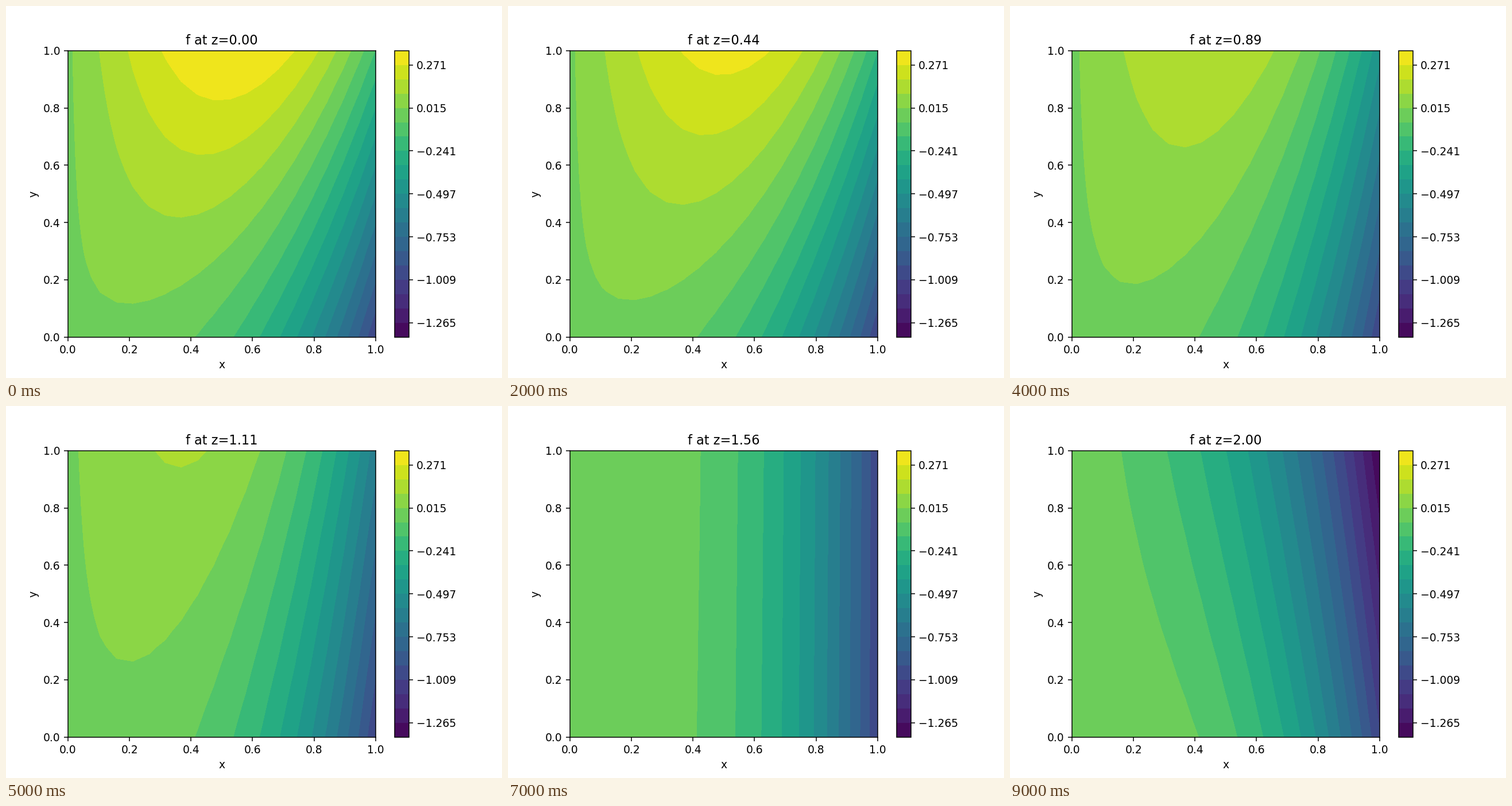
A matplotlib script for the animation above (10000 ms loop, 864 by 648 pixels).

```python
import numpy as np
import matplotlib.pyplot as plt
from matplotlib.animation import FuncAnimation

N_GRID = 20
N_BANDS = 20

x = np.linspace(0, 1, N_GRID)
y = np.linspace(0, 1, N_GRID)
z = np.linspace(0, 2, 10)
X, Y = np.meshgrid(x, y)


def field(height):
    return np.sin(X) * Y * np.cos(height) - X**3


slices = [field(h) for h in z]
levels = np.linspace(np.min(slices), np.max(slices), N_BANDS + 1)

fig, ax = plt.subplots(figsize=(6.4, 4.8), dpi=135)
contours = None


def draw(i):
    global contours
    if contours is not None:
        contours.remove()
    contours = ax.contourf(X, Y, slices[i], levels=levels, cmap="viridis")
    ax.set_title(f"f at z={z[i]:.2f}")
    return [contours]


draw(0)
fig.colorbar(contours, ax=ax)
ax.set_xlabel("x")
ax.set_ylabel("y")

anim = FuncAnimation(fig, draw, frames=len(z), interval=1000, repeat=True)
plt.show()
```
